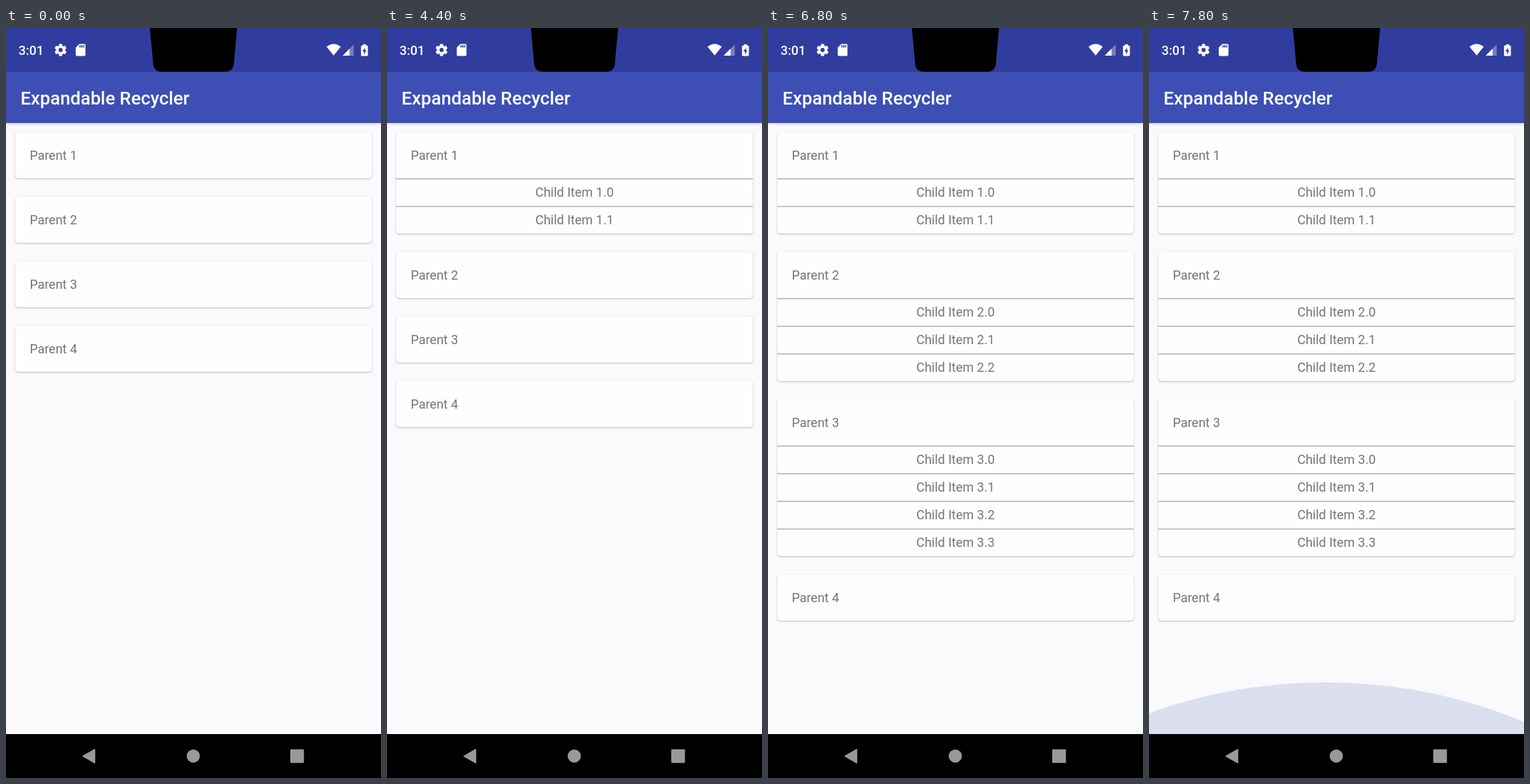
Animation of 529x1058 px, one loop 8 s. Source, as an HTML page:

```html
<!DOCTYPE html>
<html lang="en">
<head>
<meta charset="utf-8">
<title>Expandable list</title>
<style>
  html, body { margin: 0; width: 100%; height: 100%; overflow: hidden; }
  body {
    position: relative;
    background: #faf9fb;
    font: 18px Roboto, sans-serif;
    color: #757575;
  }

  .bar {
    position: absolute;
    top: 0;
    width: 529px;
    height: 133.7px;
    background: linear-gradient(#303d9e 61.7px, #3d4fb4 0);
    box-shadow: 0 1px 4px rgba(0, 0, 0, .22);
  }
  .list { position: absolute; left: 12.7px; top: 147px; width: 503.6px; }
  .card {
    margin-bottom: 26px;
    border-radius: 4.5px;
    background: #fefdff;
    box-shadow: 0 1px 2.5px rgba(0, 0, 0, .25), 0 0 1px rgba(0, 0, 0, .12);
  }
  .head { padding-left: 20.7px; line-height: 65px; }

  .kids {
    height: 0;
    overflow: hidden;
    line-height: 39px;
    text-align: center;
    animation: 8s step-end infinite;
  }
  .kids div {
    height: 39px;
    background: linear-gradient(#b3b3b3 1px, #dadada 1px 2px, transparent 0);
  }
  .k1 { --full: 78px; animation-name: open1; }
  .k2 { --full: 117px; animation-name: open2; }
  .k3 { --full: 156px; animation-name: open3; }
  @keyframes open1 { 0% { height: 0 } 55%, 100% { height: var(--full) } }
  @keyframes open2 { 0% { height: 0 } 71.25%, 100% { height: var(--full) } }
  @keyframes open3 { 0% { height: 0 } 85%, 100% { height: var(--full) } }

  svg { position: absolute; left: 0; top: 0; }
  text { font-weight: 500; fill: #fff; }

  /* overscroll glow, squashed against the bottom edge */
  .glow {
    fill: #3f51b5;
    opacity: 0;
    transform-origin: 0 996px;
    animation: glow 8s step-end infinite;
  }
  @keyframes glow {
    0% { opacity: 0; transform: scaleY(0) }
    95% { opacity: .118; transform: scaleY(.741) }
    96.25% { opacity: .14; transform: scaleY(.812) }
    97.5%, 100% { opacity: .155; transform: scaleY(.859) }
  }
</style>
</head>
<body>
<div class="bar"></div>

<div class="list">
  <div class="card">
    <div class="head">Parent 1</div>
    <div class="kids k1"><div>Child Item 1.0</div><div>Child Item 1.1</div></div>
  </div>
  <div class="card">
    <div class="head">Parent 2</div>
    <div class="kids k2"><div>Child Item 2.0</div><div>Child Item 2.1</div><div>Child Item 2.2</div></div>
  </div>
  <div class="card">
    <div class="head">Parent 3</div>
    <div class="kids k3"><div>Child Item 3.0</div><div>Child Item 3.1</div><div>Child Item 3.2</div><div>Child Item 3.3</div></div>
  </div>
  <div class="card">
    <div class="head">Parent 4</div>
  </div>
</div>

<svg width="529" height="1058" viewBox="0 0 529 1058">
  <defs><path id="tooth" d="M-2-8.5H2L2.9-5H-2.9z"/></defs>

  <circle class="glow" cx="249" cy="1546" r="635"/>

  <!-- status bar -->
  <path d="M203 0L207.5 50Q208.5 61.7 220 61.7H309Q320.5 61.7 321.5 50L326 0z"/>
  <text x="17.8" y="38">3:01</text>
  <g fill="#fff">
    <g transform="translate(77 31)">
      <circle r="4.6" fill="none" stroke="#fff" stroke-width="3.4"/>
      <use href="#tooth"/>
      <use href="#tooth" transform="rotate(60)"/>
      <use href="#tooth" transform="rotate(120)"/>
      <use href="#tooth" transform="rotate(180)"/>
      <use href="#tooth" transform="rotate(240)"/>
      <use href="#tooth" transform="rotate(300)"/>
    </g>
    <path transform="translate(95 20.7) scale(.857)" d="M18 2h-8L4 8V20c0 1.1.9 2 2 2h12c1.1 0 2-.9 2-2V4c0-1.1-.9-2-2-2zm-6 6h-2V4h2zm3 0h-2V4h2zm3 0h-2V4h2z"/>
    <path d="M462.2 38.8L452.2 26.6Q462.2 18.6 472.2 26.6z"/>
    <path d="M475 39H490.5V23.3z" opacity=".35"/>
    <path d="M475 39H484.6V29.3z"/>
    <path d="M503.5 23h4.3v1.8h1.5q1.2 0 1.2 1.2v12.2q0 1.2-1.2 1.2h-7.3q-1.2 0-1.2-1.2V26q0-1.2 1.2-1.2h1.5z"/>
  </g>
  <path d="M506.4 27.4L502.8 33h2.1v4.3L508.5 31.5h-2.1z" fill="#303d9e"/>

  <text x="20.6" y="107.5" font-size="25.7">Expandable Recycler</text>

  <!-- navigation bar -->
  <rect y="996" width="529" height="62"/>
  <g fill="#999">
    <path d="M108 1027.2L125.3 1017.3V1037.1z" stroke="#999" stroke-linejoin="round"/>
    <circle cx="264.2" cy="1027" r="9.3"/>
    <rect x="401" y="1017.5" width="19.3" height="19.3" rx="1"/>
  </g>
</svg>
</body>
</html>
```
